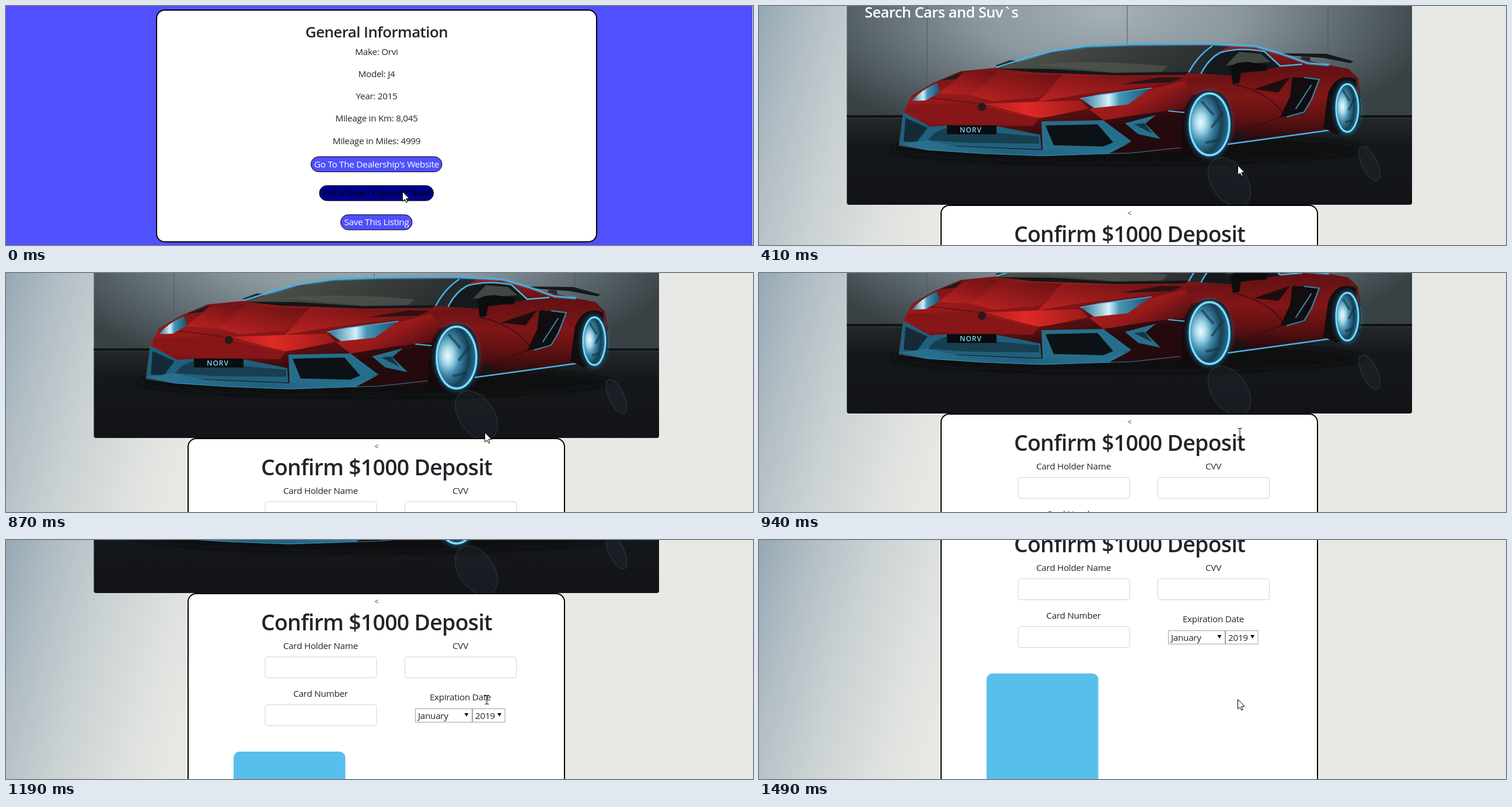
Animation, 1280 px wide and 410 px high, one loop 1720 ms. Source, as an HTML page:

```html
<!DOCTYPE html>
<html lang="en">
<head>
<meta charset="utf-8">
<title>Car listing deposit</title>
<style>
html, body { margin: 0; width: 100%; height: 100%; overflow: hidden; background: #e8e9e4; }
svg { display: block; width: 100vw; height: 100vh; }
text { font-family: "Open Sans", "Noto Sans", sans-serif; font-size: 15.3px; letter-spacing: -.02em; fill: #212529; }
.mid { text-anchor: middle; }
.bold { font-weight: 600; }
.light { fill: #fff; }
.glow { fill: none; stroke: #45b3e2; stroke-width: 2.6; stroke-linecap: round; stroke-linejoin: round; }
.field { fill: #fff; stroke: #ced4da; }
.select { fill: #fff; stroke: #a0a0a0; }
</style>
</head>
<body>
<svg viewBox="0 0 1280 410" preserveAspectRatio="none">
<defs>
  <linearGradient id="haze" gradientUnits="userSpaceOnUse" x1="0" y1="0" x2="375" y2="110">
    <stop offset="0" stop-color="#96a8b5"/><stop offset=".2" stop-color="#afbbc3"/>
    <stop offset=".5" stop-color="#cbd2d3"/><stop offset=".8" stop-color="#dfe2df"/>
    <stop offset="1" stop-color="#e8e9e4"/>
  </linearGradient>
  <radialGradient id="wall" gradientUnits="userSpaceOnUse" cx="0" cy="0" r="1" gradientTransform="translate(600 10) scale(570 235)">
    <stop offset="0" stop-color="#a5b1b5"/><stop offset=".4" stop-color="#8a979c"/>
    <stop offset=".7" stop-color="#606c71"/><stop offset="1" stop-color="#384144"/>
  </radialGradient>
  <linearGradient id="floor" x2="0" y2="1">
    <stop offset="0" stop-color="#24282c"/><stop offset=".35" stop-color="#15181b"/><stop offset="1" stop-color="#121317"/>
  </linearGradient>
  <linearGradient id="paint" gradientUnits="userSpaceOnUse" x1="330" y1="95" x2="360" y2="255">
    <stop offset="0" stop-color="#5f1214"/><stop offset=".35" stop-color="#981a1b"/>
    <stop offset=".6" stop-color="#7f1516"/><stop offset="1" stop-color="#240a0d"/>
  </linearGradient>
  <linearGradient id="side" x2="0" y2="1">
    <stop offset="0" stop-color="#621113"/><stop offset=".4" stop-color="#811617"/>
    <stop offset=".7" stop-color="#5b1012"/><stop offset="1" stop-color="#1b090b"/>
  </linearGradient>
  <linearGradient id="hood" x1="0" y1="1" x2="1" y2="0">
    <stop offset="0" stop-color="#bd2321"/><stop offset=".55" stop-color="#8f191a"/><stop offset="1" stop-color="#661214"/>
  </linearGradient>
  <linearGradient id="nose">
    <stop offset="0" stop-color="#a81c1c"/><stop offset=".45" stop-color="#e02a26"/><stop offset="1" stop-color="#981a1a"/>
  </linearGradient>
  <linearGradient id="fender" x2="1" y2=".7">
    <stop offset="0" stop-color="#b41f1e"/><stop offset=".6" stop-color="#981a1b"/><stop offset="1" stop-color="#4c0e10"/>
  </linearGradient>
  <linearGradient id="glass" x2="1" y2=".2">
    <stop offset="0" stop-color="#545850"/><stop offset=".5" stop-color="#3e4340"/><stop offset="1" stop-color="#2c3030"/>
  </linearGradient>
  <linearGradient id="lamp">
    <stop offset="0" stop-color="#1f6d90"/><stop offset=".4" stop-color="#d4f1f9"/><stop offset=".55" stop-color="#4796b7"/><stop offset="1" stop-color="#17526c"/>
  </linearGradient>
  <linearGradient id="lip">
    <stop offset="0" stop-color="#2a7592"/><stop offset=".5" stop-color="#1f617e"/><stop offset="1" stop-color="#2a7896"/>
  </linearGradient>
  <radialGradient id="rim" cx=".28" cy=".47" r=".7">
    <stop offset="0" stop-color="#f0fbfe"/><stop offset=".2" stop-color="#a6d9ea"/>
    <stop offset=".45" stop-color="#3d87a8"/><stop offset=".75" stop-color="#173f54"/><stop offset="1" stop-color="#236f91"/>
  </radialGradient>
  <filter id="soft" x="-30%" y="-30%" width="160%" height="160%"><feGaussianBlur stdDeviation="4"/></filter>
  <clipPath id="frame"><rect x="150.500" y="-60" width="968.500" height="401" rx="4"/></clipPath>
</defs>

<g id="deposit">
  <rect width="1280" height="410" fill="url(#haze)"/>
  <g id="page">
    <g clip-path="url(#frame)">
      <rect x="150" y="-60" width="970" height="250" fill="url(#wall)"/>
      <path d="M288 0V189M631 0V66M975 0V90" stroke="#4c5659" stroke-width="1.500" opacity=".65"/>
      <rect x="150" y="188" width="970" height="153" fill="url(#floor)"/>
      <path d="M150 189H1120" stroke="#0a0c0e" stroke-width="3"/>
      <path d="M150 193H1120" stroke="#4b5358" opacity=".4"/>
      <ellipse cx="630" cy="245" rx="405" ry="26" fill="#07090b" opacity=".8" filter="url(#soft)"/>
      <g fill="#4d7586" fill-opacity=".09" stroke="#628a9c" stroke-opacity=".16" stroke-width="2">
        <ellipse cx="806" cy="302" rx="30" ry="47" transform="rotate(-35 806 302)"/>
        <ellipse cx="1046" cy="270" rx="13" ry="32" transform="rotate(-25 1046 270)"/>
      </g>

      <path d="M884 81L972 82 1019 95 1013 98 966 89 895 84Z" fill="#16191b"/>
      <path d="M930 87L944 88 945 101 925 99Z" fill="#24282a"/>
      <path d="M247 183L262 153 300 131 345 112 405 106 440 95 500 79 560 68 640 65 770 64 850 69 900 84 975 101 1010 108 1026 124 1031 155 1020 205 975 214 815 237 760 253 722 250 640 252 484 256 380 252 290 247 239 238Z" fill="url(#paint)"/>
      <path d="M725 126L800 118 895 105 975 102 1010 108 1027 127 1030 165 990 180 972 214 812 237 810 190 780 148 740 152Z" fill="url(#side)"/>
      <path d="M308 150L350 116 410 112 360 152Z" fill="url(#hood)"/>
      <path d="M360 152L420 116 520 118 480 157 400 163Z" fill="url(#hood)"/>
      <path d="M520 120L725 122 680 136 556 151 478 164Z" fill="url(#hood)"/>
      <path d="M370 168L482 164 550 162 565 176 478 194 400 191Z" fill="url(#nose)"/>
      <path d="M254 170L370 168 478 194 470 206 300 202 252 181Z" fill="#861617"/>
      <path d="M566 177L670 143 730 128 742 150 728 177 666 184 590 196Z" fill="url(#fender)"/>
      <path d="M270 157L310 159 380 168 478 193 560 183" fill="none" stroke="#420d10"/>
      <path d="M620 134L690 122 726 123 706 131Z" fill="#2b1213"/>
      <path d="M310 128L350 113 337 125Z" fill="#1e1c1e"/>

      <path d="M409 107L470 88 558 70 640 67 773 68 735 114 610 116 500 109Z" fill="url(#glass)"/>
      <path d="M409 107L500 108 610 115 735 113 731 118 612 119 470 114Z" fill="#131618"/>
      <path d="M474 101Q570 91 700 103L690 113 610 114Z" fill="#555a51" opacity=".6"/>
      <path d="M773 67L808 69Q778 80 757 116L735 115Q752 85 773 67Z" fill="#22282b"/>
      <path d="M758 116Q770 91 790 80 823 69 866 78L894 104 808 119Z" fill="#16191b"/>
      <path d="M822 79L860 82 876 96 800 102Z" fill="#424744"/>
      <path d="M808 106Q812 96 838 96L872 101 870 111 826 114 823 132 812 134Z" fill="#0b0d0f"/>
      <path d="M405 102L430 93 443 94 413 106Z" fill="#202c31"/>
      <path d="M443 94L500 78 560 69 640 66 770 65 850 69 895 82 940 98 975 101" class="glow" style="stroke-width:6;opacity:.35"/>
      <path class="glow" d="M408 105L443 94 500 78 560 69 640 66 770 65 850 69 895 82 940 98 975 101M737 113Q752 85 776 69M758 115Q770 91 790 80 823 70 866 78L893 103 930 100"/>

      <path d="M262 163Q276 145 305 132L310 148 286 162Z" fill="url(#lamp)"/>
      <path d="M551 159L585 152 672 141 632 169 574 175Z" fill="url(#lamp)"/>
      <path d="M551 159L585 152 672 141" class="glow" style="stroke-width:1.500"/>
      <circle cx="382" cy="173" r="7" fill="#29191b"/>

      <path d="M247 182L293 207 322 205 407 206 482 221 484 246 340 240 240 238Z" fill="#1f607c"/>
      <path d="M251 192L289 209 270 234 248 232Z" fill="#142b37"/>
      <path d="M300 218L318 210 480 224 480 236 360 235 290 230Z" fill="#173f50"/>
      <path d="M484 198L590 196 638 232 602 247 486 252Z" fill="#256e8b"/>
      <path d="M491 205L580 203 607 234 590 241 505 239Z" fill="#0c1115"/>
      <path d="M239 237L287 230 340 241 482 247 600 246 638 233 600 253 484 257 380 253 290 247Z" fill="url(#lip)"/>
      <path d="M240 239L290 247 380 253 484 257 640 252 722 243" class="glow" style="stroke-width:1.200;opacity:.7"/>
      <path d="M627 201L680 187 662 202 688 228 650 220Z" fill="#286f8c"/>
      <path d="M643 203L660 201 674 219Z" fill="#153643"/>
      <path d="M702 180L732 183" class="glow" style="stroke-width:2"/>
      <rect x="322" y="205" width="85" height="15" fill="#080c10"/>
      <text class="mid bold" x="363" y="217" style="font-size:12px;fill:#8bd2ec;letter-spacing:1px">NORV</text>

      <path d="M810 133Q880 150 900 189L822 215" fill="none" stroke="#390d10" stroke-width="1.500"/>
      <path d="M848 143L910 122 890 148Z" fill="#200c0e"/>
      <path d="M914 122L960 125 935 184 893 191 910 155Z" fill="#110d10"/>
      <path d="M935 123L960 126 947 160 934 182 905 190M946 136L920 176" class="glow" style="stroke:#3287a9;stroke-width:2.200"/>
      <path d="M818 215L832 218 832 229 819 230Z" fill="#14161a"/>
      <path d="M804 237L870 228 978 213" class="glow"/>
      <path d="M975 150Q990 112 1023 126L1030 200 990 220 967 209Z" fill="#120d10"/>
      <path d="M724 250Q718 148 772 145 810 145 811 205L800 245 752 263Z" fill="#15090c"/>
      <g id="wheels"></g>
    </g>
    <text class="bold light" x="181" y="20" style="font-size:25.400px">Search Cars and Suv`s</text>

    <rect x="312" y="342" width="645" height="620" rx="14" fill="#fff" stroke="#000" stroke-width="2"/>
    <text class="mid" x="635" y="360" style="font-size:12.500px;fill:#24435c">&lt;</text>
    <text class="mid bold" x="635" y="405" style="font-size:37.500px">Confirm $1000 Deposit</text>
    <g id="form"></g>
    <rect x="390" y="613" width="191.500" height="192" rx="10" fill="#58bfec"/>
  </g>
</g>

<g id="listing">
  <rect width="1279" height="410" fill="#5050ff"/>
  <rect x="258" y="7" width="754" height="397.500" rx="14" fill="#fff" stroke="#000" stroke-width="2"/>
  <text class="mid bold" x="635" y="53.500" style="font-size:25.800px">General Information</text>
  <g id="facts"></g>
  <rect id="focus" x="536.500" y="307.500" width="197" height="27" fill="none" stroke="#78b1ea"/>
</g>

<g id="pointer">
  <path id="arrow" d="M.5.5V17L4.300 13.500 6.800 19 9.200 18 6.800 12.400H12Z" fill="#fff" stroke="#000"/>
  <path id="beam" d="M.5-6.500H3Q4 -6.500 4 -5.500Q4 -6.500 5-6.500H7.500M4-5.500V7.500M.5 8.500H3Q4 8.500 4 7.500Q4 8.500 5 8.500H7.500" fill="none" stroke="#000"/>
</g>
</svg>

<script>
const $ = id => document.getElementById(id);
const add = (id, markup) => $(id).insertAdjacentHTML("beforeend", markup);
const label = (x, y, str, cls = "mid") => `<text class="${cls}" x="${x}" y="${y}">${str}</text>`;
const box = (x, y, w, h, cls, r = 0) =>
  `<rect class="${cls}" x="${x}" y="${y}" width="${w}" height="${h}" rx="${r}"/>`;

// Listing page
["Make: Orvi", "Model: J4", "Year: 2015", "Mileage in Km: 8,045", "Mileage in Miles: 4999"]
  .forEach((str, i) => add("facts", label(635, 83.5 + 38.3 * i, str)));

function button(x, y, w, str, fill, ink) {
  add("facts", `<rect x="${x}" y="${y}" width="${w}" height="26" rx="13" fill="${fill}" stroke="#000"/>
    <text class="mid" x="635" y="${y + 18}" style="fill:${ink}">${str}</text>`);
}
button(522.5, 258.5, 224.5, "Go To The Dealership's Website", "#5050ff", "#fff");
button(537, 308, 195.5, "Put A Down Payment Now!", "#00008b", "#000");
button(573.5, 358, 122.5, "Save This Listing", "#5050ff", "#fff");

// Deposit form
function field(x, mid, y, str) {
  add("form", label(mid, y, str) + box(x, y + 13.5, 191, 36, "field", 4));
}
field(444, 539, 437, "Card Holder Name");
field(683.5, 778.5, 437, "CVV");
field(444, 539, 519, "Card Number");
add("form", label(778.5, 525, "Expiration Date"));

function select(x, w, str) {
  add("form", box(x, 539.5, w, 23, "select") + label(x + 4.5, 556.5, str, "") +
    `<path d="M${x + w - 13} 547h7l-3.500 6z"/>`);
}
select(701.5, 97, "January");
select(799.5, 55.5, "2019");

// Wheels with a lit ring
function wheel(x, y, rx, ry, w) {
  add("wheels", `<g transform="translate(${x} ${y})">
    <ellipse rx="${rx + 4}" ry="${ry + 3}" fill="#0e161b"/>
    <ellipse rx="${rx}" ry="${ry}" fill="none" stroke="#2596c6" stroke-width="${w + 5}" opacity=".6" filter="url(#soft)"/>
    <ellipse rx="${rx}" ry="${ry}" fill="url(#rim)" stroke="#2b9dcc" stroke-width="${w + 2}"/>
    <ellipse rx="${rx}" ry="${ry}" fill="none" stroke="#9ae2f6" stroke-width="${w}"/>
    <path d="M${-rx * .4} ${-ry * .75}L${rx * .2} ${-ry * .3}M${rx * .7} ${-ry * .4}L${rx * .1} ${ry * .1}M${rx * .5} ${ry * .5}L${-rx * .2} ${ry * .6}"
      stroke="#113445" stroke-width="${w + 2}" opacity=".6"/></g>`);
}
wheel(772, 203, 34, 53, 2.5);
wheel(1008, 175, 19, 41, 2);

// Motion: the screen refreshes only at these moments
const LOOP = 1720, OPEN = 410;
const ticks = [0, 80, 160, 240, 320, 410, 790, 870, 940, 1030, 1110, 1190, 1260, 1350, 1420, 1490];
const scrollKeys = [[780, 0], [790, 1], [870, 58], [940, 100], [1030, 145], [1110, 200],
  [1190, 250], [1260, 300], [1340, 300], [1350, 312], [1420, 358], [1490, 384]];

function scrollAt(t) {
  const i = scrollKeys.findIndex(k => k[0] >= t);
  if (i < 0) return 384;
  if (i === 0) return 0;
  const [t0, y0] = scrollKeys[i - 1], [t1, y1] = scrollKeys[i];
  return Math.round(y0 + (y1 - y0) * (t - t0) / (t1 - t0));
}

const ease = u => u * u * (3 - 2 * u);

function draw(ms) {
  const t = ticks.filter(k => k <= ms).pop();
  const u = ease(Math.min(1, Math.max(0, (t - 80) / 240)));
  const overText = t >= 940 && t < 1260;
  $("listing").style.display = t < OPEN ? "" : "none";
  $("deposit").style.display = t < OPEN ? "none" : "";
  $("focus").style.display = t >= 80 ? "" : "none";
  $("page").setAttribute("transform", `translate(0 ${-scrollAt(t)})`);
  $("pointer").setAttribute("transform",
    `translate(${Math.round(679 + 141 * u)} ${Math.round(318 - 45 * u)})`);
  $("arrow").style.display = overText ? "none" : "";
  $("beam").style.display = overText ? "" : "none";
}

const start = performance.now();
function loop() {
  draw((performance.now() - start) % LOOP);
  requestAnimationFrame(loop);
}
loop();
</script>
</body>
</html>
```
